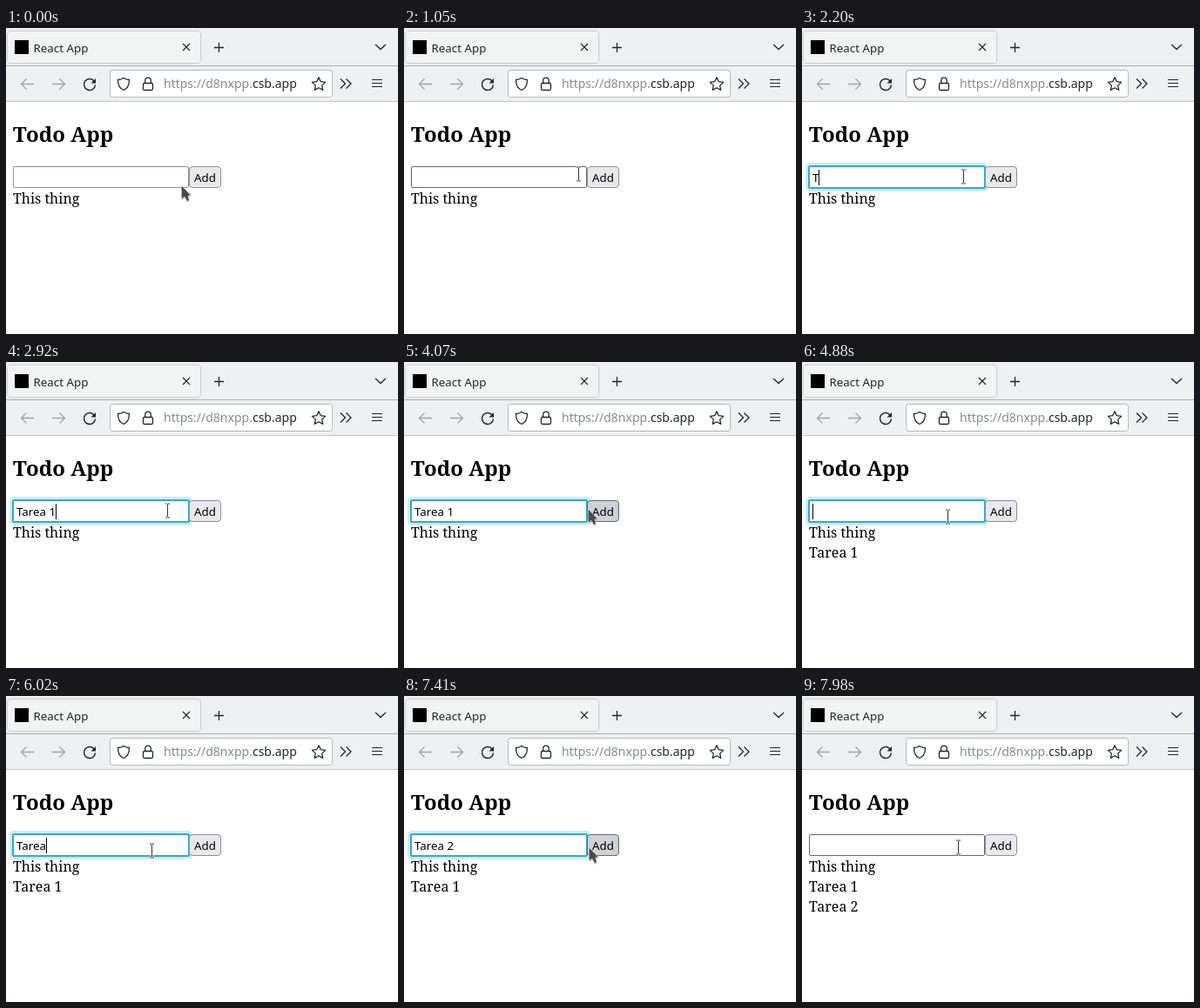
An HTML page that plays this animation: 450x352 px, repeating every 8000 ms.

```html
<!DOCTYPE html>
<html lang="en">
<head>
<meta charset="utf-8">
<title>Todo App</title>
<style>
  html, body { margin: 0; width: 100%; height: 100%; overflow: hidden; background: #fff; }
  svg { display: block; }
  text { white-space: pre; }
  .ui { font: 13.333px "Noto Sans", sans-serif; fill: #000; }
  .page { font: 16px "Noto Serif", serif; fill: #000; }
  .icon { fill: none; stroke: #232629; stroke-width: 1.3; }
  .off { stroke: #a3a5a7; }
</style>
</head>
<body>
<svg width="450" height="352" viewBox="0 0 450 352">
  <defs>
    <filter id="soft" x="-10%" y="-20%" width="120%" height="150%">
      <feDropShadow dx="0" dy="0" stdDeviation="1" flood-opacity=".4"/>
    </filter>
  </defs>

  <!-- browser bars -->
  <path fill="#eff0f1" d="M0 0H450V84H0Z"/>
  <path fill="#abadae" d="M0 43H450V44H0Z"/>
  <path fill="#c3c4c5" d="M0 84H450V85H0Z"/>
  <rect x="2" y="4" width="221" height="36" rx="4" fill="#f2f3f3" filter="url(#soft)"/>
  <rect x="10" y="14" width="16" height="16"/>
  <text class="ui" x="31.5" y="28" style="fill:#232629">React App</text>
  <g class="icon">
    <path d="M203 18l8 8m0-8l-8 8" stroke-width="1.1"/>
    <path d="M244.500 17v11m-5.500-5.500h11"/>
    <path d="M424 19l6 5.500 6-5.500"/>
    <path class="off" d="M32 64.500H17.500m6-6l-6 6 6 6M53 64.500H67.500m-6-6l6 6-6 6"/>
    <path d="M101.500 61.500a6.500 6.500 0 1 0 1 4" stroke-width="1.5"/>
    <path d="M103 58v5.500h-5.500z" fill="#232629" stroke="none"/>
    <path d="M384 58.500l5.500 5.500-5.500 5.500m6.500-11l5.500 5.500-5.500 5.500"/>
    <path d="M420 59.500h12m-12 4h12m-12 4h12" stroke-width="1.2"/>
  </g>
  <rect x="119.500" y="48.500" width="255" height="31" rx="3" fill="#fff" stroke="#b5b7b8"/>
  <g class="icon" stroke-linejoin="round">
    <path d="M135 57.500c2 1.500 4 2 6.500 2 0 6-1.500 10-6.500 12-5-2-6.500-6-6.500-12 2.500 0 4.500-.5 6.500-2z"/>
    <rect x="157.500" y="63.500" width="11" height="8" rx="1.500"/>
    <path d="M159.700 63.500v-3a3.300 3.300 0 0 1 6.600 0v3"/>
    <path d="M359 56.800l2.300 4.900 5.300.7-3.900 3.700 1 5.300-4.700-2.600-4.700 2.600 1-5.300-3.900-3.700 5.300-.7z"/>
  </g>
  <text class="ui" x="181" y="69" style="font-size:14px;fill:#898b8d">https://d8nxpp.<tspan fill="#232629">csb.app</tspan></text>

  <!-- page -->
  <text class="page" x="8" y="131" style="font-weight:700;font-size:24px">Todo App</text>
  <rect id="glow" x="4" y="155" width="210" height="33" rx="5" fill="#c9eff9"/>
  <rect id="field" fill="#fff" rx="1.500"/>
  <text class="ui" id="typed" x="12" y="177"></text>
  <path id="caret" d="M0 163h1v18h-1z"/>
  <rect id="button" x="210.500" y="159.500" width="36" height="24" rx="3.500"/>
  <text class="ui" x="216" y="177">Add</text>
  <text class="page" x="8" y="202">This thing</text>
  <text class="page" id="one" x="8" y="225">Tarea 1</text>
  <text class="page" id="two" x="8" y="248">Tarea 2</text>

  <!-- pointers -->
  <g id="arrow">
    <path d="M1 2V17L4 15l3 5 3-1.500-1-5.500h3z" opacity=".18"/>
    <path d="M.3 0V15.700L4 13.200l3 5.300 2.300-1.200-1.300-5.600h3.700z" fill="#4a4a4a" stroke="#fff" stroke-width=".5"/>
  </g>
  <g id="beam" fill="none">
    <path d="M-3 -8H3M0 -8V8M-3 8H3" stroke="#fff" stroke-width="2.500" opacity=".8"/>
    <path d="M-2.500 -8H-.5M.5 -8H2.500M0 -7.500V7.500M-2.500 8H-.5M.5 8H2.500" stroke="#333"/>
  </g>
</svg>
<script>
const LOOP = 8000;
const $ = id => document.getElementById(id);

// Each track is a list of [start time, value...]; values hold until the next entry.
const pointer = [
  [0, 'arrow', 201, 181], [80, 'beam', 200.5, 168], [160, 'arrow', 198, 150],
  [320, 'arrow', 196, 150], [730, 'arrow', 198, 150], [890, 'beam', 200.5, 163],
  [970, 'beam', 200.5, 166], [1050, 'beam', 200.5, 168], [1130, 'beam', 194.5, 170],
  [1210, 'beam', 185.5, 171], [3990, 'beam', 200.5, 171], [4070, 'arrow', 211, 169],
  [4470, 'beam', 188.5, 175], [4550, 'beam', 167.5, 178], [7250, 'beam', 175.5, 177],
  [7330, 'beam', 196.5, 176], [7410, 'arrow', 212, 174], [7900, 'beam', 194.5, 174],
  [7980, 'beam', 179.5, 174]
];
const typing = [
  [0, ''], [2200, 'T'], [2360, 'Ta'], [2440, 'Tar'], [2520, 'Tare'], [2600, 'Tarea'],
  [2760, 'Tarea '], [2920, 'Tarea 1'], [4390, ''], [5620, 'T'], [5780, 'Tar'],
  [5860, 'Tare'], [6020, 'Tarea'], [6260, 'Tarea '], [6670, 'Tarea 2'], [7820, '']
];
const fieldState = [
  [0, 'idle'], [80, 'hover'], [160, 'idle'], [890, 'hover'], [1290, 'focus'],
  [4310, 'idle'], [4470, 'hover'], [4880, 'focus'], [7740, 'idle'], [7900, 'hover']
];
const caretOn = [
  [0, false], [1290, true], [3660, false], [4880, true], [6100, false],
  [6260, true], [7250, false]
];
const buttonState = [
  [0, 'idle'], [4070, 'hover'], [4310, 'down'], [4390, 'hover'], [4470, 'idle'],
  [7410, 'hover'], [7740, 'down'], [7820, 'hover'], [7900, 'idle']
];
const line = { idle: '#8f8f9d', hover: '#676774', down: '#484851', focus: '#36a8ce' };
const face = { idle: '#e9e9ed', hover: '#d0d0d7', down: '#b1b1b9' };

const at = (track, t) => track.findLast(step => step[0] <= t).slice(1);
const show = (id, on) => $(id).setAttribute('visibility', on ? 'visible' : 'hidden');
const set = (id, attrs) => {
  for (const name in attrs) $(id).setAttribute(name, attrs[name]);
};

function draw(t) {
  const [kind, x, y] = at(pointer, t);
  for (const id of ['arrow', 'beam']) show(id, id === kind);
  set(kind, { transform: `translate(${x} ${y})` });

  const [state] = at(fieldState, t);
  const grow = state === 'focus' ? 0.5 : 0;
  show('glow', grow);
  set('field', {
    x: 8.5 - grow, y: 159.5 - grow, width: 201 + 2 * grow, height: 24 + 2 * grow,
    stroke: line[state], 'stroke-width': 1 + 2 * grow
  });

  const [text] = at(typing, t);
  $('typed').textContent = text;
  const width = text ? $('typed').getComputedTextLength() : 0;
  set('caret', { transform: `translate(${Math.floor(12 + width)} 0)` });
  show('caret', at(caretOn, t)[0]);

  const [press] = at(buttonState, t);
  set('button', { fill: face[press], stroke: line[press] });
  show('one', t >= 4390);
  show('two', t >= 7820);
}

function tick() {
  draw(performance.now() % LOOP);
  requestAnimationFrame(tick);
}
tick();
</script>
</body>
</html>
```
